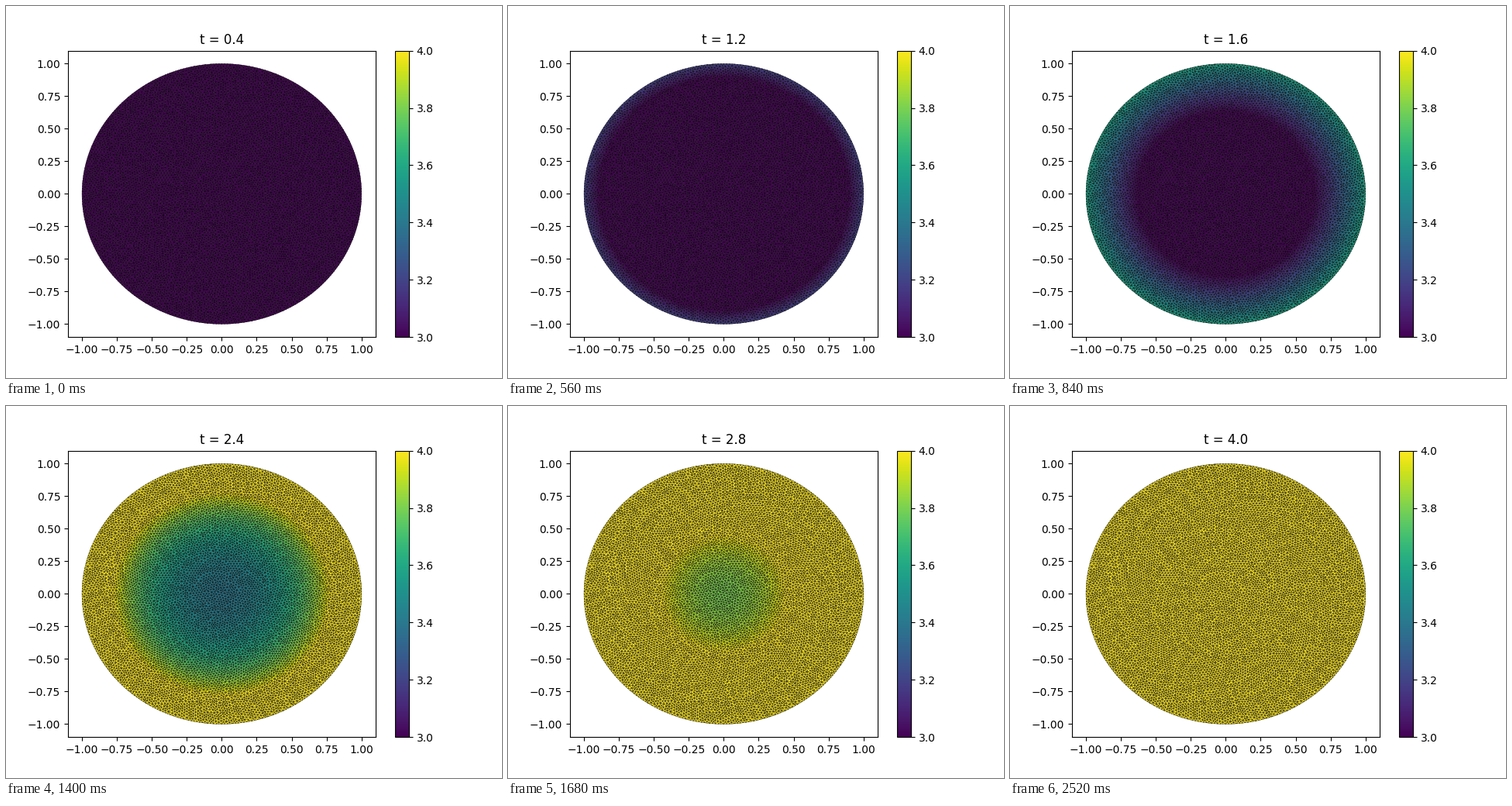
These frames come from a looping animation (640 px wide and 480 px high, 2.8 s). A matplotlib script:

```python
import numpy as np
import matplotlib.pyplot as plt
from matplotlib.animation import FuncAnimation
from matplotlib.tri import Triangulation

FRAMES = 10
INTERVAL = 280
TIME_STEP = 0.4
EDGE = 0.02
SMOOTHING_STEPS = 20


def disk_mesh(edge):
    """Unstructured triangle mesh of the unit disk with a fixed, even rim."""
    rng = np.random.default_rng(7)
    n_rim = 4 * int(round(np.pi / 2 / edge))
    n_inner = int(np.pi * (1 - edge / 2) ** 2 / (np.sqrt(3) / 2 * edge**2))

    rim_angle = 2 * np.pi * np.arange(n_rim) / n_rim
    rim = np.column_stack([np.cos(rim_angle), np.sin(rim_angle)])

    k = np.arange(n_inner)
    radius = (1 - edge / 2) * np.sqrt((k + 0.5) / n_inner)
    angle = k * np.pi * (3 - np.sqrt(5))
    inner = np.column_stack([radius * np.cos(angle), radius * np.sin(angle)])
    inner += rng.uniform(-0.3, 0.3, inner.shape) * edge
    distance = np.hypot(*inner.T)
    inner *= np.minimum(1, (1 - 0.7 * edge) / distance)[:, None]

    points = np.vstack([rim, inner])
    for _ in range(SMOOTHING_STEPS):
        start, end = Triangulation(*points.T).edges.T
        total = np.zeros_like(points)
        np.add.at(total, start, points[end])
        np.add.at(total, end, points[start])
        count = np.bincount(np.r_[start, end], minlength=len(points))
        mean = total / np.maximum(count, 1)[:, None]
        points[n_rim:] = mean[n_rim:]
    return Triangulation(*points.T)


def solution(x, y, t):
    return 1 + x**2 + y**2 + t


mesh = disk_mesh(EDGE)


def cell_values(t):
    nodal = solution(mesh.x, mesh.y, t)
    return nodal[mesh.triangles].mean(axis=1)


fig, ax = plt.subplots(figsize=(6.4, 4.8), dpi=100)
cells = ax.tripcolor(mesh, facecolors=cell_values(TIME_STEP), cmap="viridis",
                     vmin=3, vmax=4, edgecolors="k")
fig.colorbar(cells, ax=ax, ticks=np.linspace(3, 4, 6))
title = ax.set_title("")


def update(frame):
    t = (frame + 1) * TIME_STEP
    cells.set_array(cell_values(t))
    title.set_text(f"t = {t:.1f}")
    return cells, title


animation = FuncAnimation(fig, update, frames=FRAMES, interval=INTERVAL,
                          repeat=True, repeat_delay=0, blit=False)
plt.show()
```
